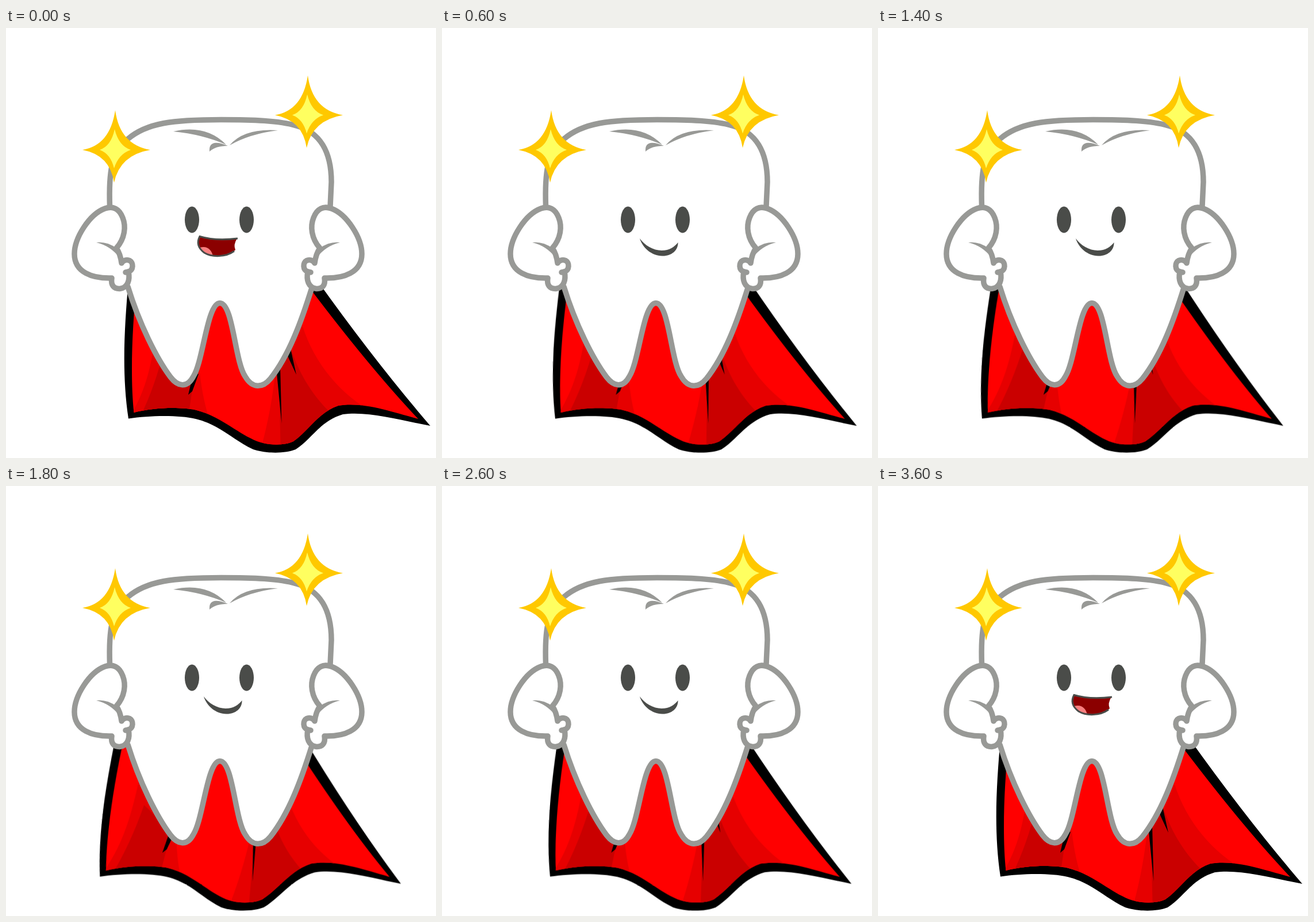
Animation of 748x748 px, one loop 3800 ms. Source, as an HTML page without scripts:

```html
<!DOCTYPE html>
<html lang="en">
<head>
<meta charset="utf-8">
<title>Super tooth</title>
<style>
  html, body { margin: 0; width: 100%; height: 100%; overflow: hidden; background: #fff; }
  svg { display: block; }
  .stage { width: 100vw; height: 100vh; }

  .line { fill: #fff; stroke: #989996; stroke-width: 9.5; stroke-linecap: round; stroke-linejoin: round; }
  .grey { fill: #989996; }
  .dark { fill: #4a4c49; }
  .mid { fill: #e60000; }
  .deep { fill: #ca0000; }

  /* 19 poses of 200 ms: the cape leans out and back again */
  .cape { animation: sway 3800ms infinite; transform-origin: 0 232px; }
  @keyframes sway {
    0% { transform: skewX(0deg); animation-timing-function: steps(4); }
    21.052% { transform: skewX(-2.74deg); animation-timing-function: steps(3); }
    36.842% { transform: skewX(-4.1deg); animation-timing-function: steps(2); }
    47.368% { transform: skewX(-6.33deg); animation-timing-function: steps(2); }
    57.894% { transform: skewX(-4.1deg); animation-timing-function: steps(3); }
    73.684% { transform: skewX(-2.74deg); animation-timing-function: steps(4); }
    94.736%, 100% { transform: skewX(0deg); }
  }

  /* a strip of alternating mouths moves on by one cell per pose */
  .strip { animation: talk 3800ms infinite; }
  @keyframes talk {
    0% { transform: translate(-4px, -1px); animation-timing-function: step-end; }
    5.263% { transform: translate(-100px, 0); animation-timing-function: steps(18); }
    100% { transform: translate(-1900px, 0); }
  }
</style>
</head>
<body>
<svg class="stage" viewBox="0 0 748 748">
  <defs>
    <path id="cloth" d="M228 440C219 520 216 610 222.500 669C258 660 302 659 330 664.500C373 675 400 704 437 719C455 726 484 727 500 719C528 699 543 669 578 657C620 650 665 666 717 680Q630 588 519 440Z"/>
    <clipPath id="inside"><use href="#cloth"/></clipPath>

    <g id="arm">
      <path class="line" d="M192 383C207 366 209 345 203 330C197 314 186 309 172 314C145 324 119 365 119 393C119 425 150 436 184 435C182 448 188 454 198 453.500C212 452 216 438 213 424C222 421 222 408 215 404.500C210 402 204 404 201 409Q199 393 192 383Z"/>
      <path class="grey" d="M157 373Q176 371 192 383L198 400Q182 379 157 373Z"/>
      <path class="line" d="M213 424L208 425"/>
    </g>

    <g id="star">
      <path fill="#ffc800" d="M1 -69Q9 -9 62 0Q9 9 -1 57Q-8 9 -56 0Q-8 -8 1 -69Z"/>
      <path fill="#ffff60" d="M0 -36Q7 -7 28 0Q7 7 -1 32Q-7 7 -26 0Q-6 -7 0 -36Z"/>
    </g>

    <pattern id="mouths" width="200" height="50" patternUnits="userSpaceOnUse">
      <g transform="translate(-321 -355)">
        <path fill="#8b0000" d="M337 362C355 368 380 369 402 366Q395 377 399 386C385 399 360 401 345 391C333 382 332 372 337 362Z"/>
        <path fill="#f88080" d="M337 382C350 378 358 386 360 397Q344 394 337 382Z"/>
        <path fill="none" stroke="#4a4c49" stroke-width="3" d="M403 366C380 369 355 368 337 362.500C332 372 333 382 345 391C358 399 382 399 397 388"/>
      </g>
      <path class="dark" transform="translate(-225 -356)" d="M344 366C352 378 368 387 382 387C396 387 404 381 410.500 373C411 387 399 397 383 396.500C365 396 349 383 344 366Z"/>
    </pattern>
  </defs>

  <g class="cape">
    <path d="M213 440C206 520 201 600 213 679.500C250 674 300 673 330 680C372 690 395 717 430 733C450 740 485 741 504 733C532 715 546 684 586 672C630 666 685 682 738 692Q642 580 542 440Z"/>
    <use href="#cloth" fill="#f00"/>
    <g clip-path="url(#inside)">
      <path class="mid" d="M262 515C254 590 242 632 216 675H352Q341 640 336 590Z"/>
      <path class="deep" d="M276 555Q260 622 234 675H317Q322 645 328 600Z"/>
      <path class="mid" d="M470 580Q464 660 441 740H500L630 664C575 630 530 575 512 505Z"/>
      <path class="deep" d="M474 590L478 740H520L563 668C530 635 508 598 493 550Z"/>
      <path d="M326 600L317 638L324 632L335 602ZM470 590H477L479.500 688ZM486 562L495 558L505 603Z"/>
    </g>
  </g>

  <path class="line" d="M180.500 310C178.500 252 183 215 212 193C245 165 290 159.500 374 159.500C430 159.500 475 161 505 170C546 181 566 215 566 268L564 310L575 400L540 445L532 452C514 510 492 570 460 610C446 627 428 627 416 606C398 580 395 478.500 372 478.500C350 478.500 343 580 326 606C315 627 299 624 286 607C262 575 232 515 212 450L198 445L163 400Z"/>

  <use href="#arm"/>
  <use href="#arm" transform="translate(738 0) scale(-1 1)"/>

  <path class="grey" d="M291 180Q348 167 383 203Q342 185 291 180ZM354 215Q352 191 386 205Q364 205 354 215ZM389 204Q414 174 473 178Q424 184 389 204Z"/>

  <ellipse class="dark" cx="323.500" cy="333.500" rx="12.500" ry="23"/>
  <ellipse class="dark" cx="418.500" cy="333.500" rx="12.500" ry="23"/>

  <svg x="325" y="356" width="100" height="50" overflow="hidden">
    <rect class="strip" width="2000" height="50" fill="url(#mouths)"/>
  </svg>

  <use href="#star" x="189" y="212"/>
  <use href="#star" x="524" y="151.500"/>
</svg>
</body>
</html>
```
